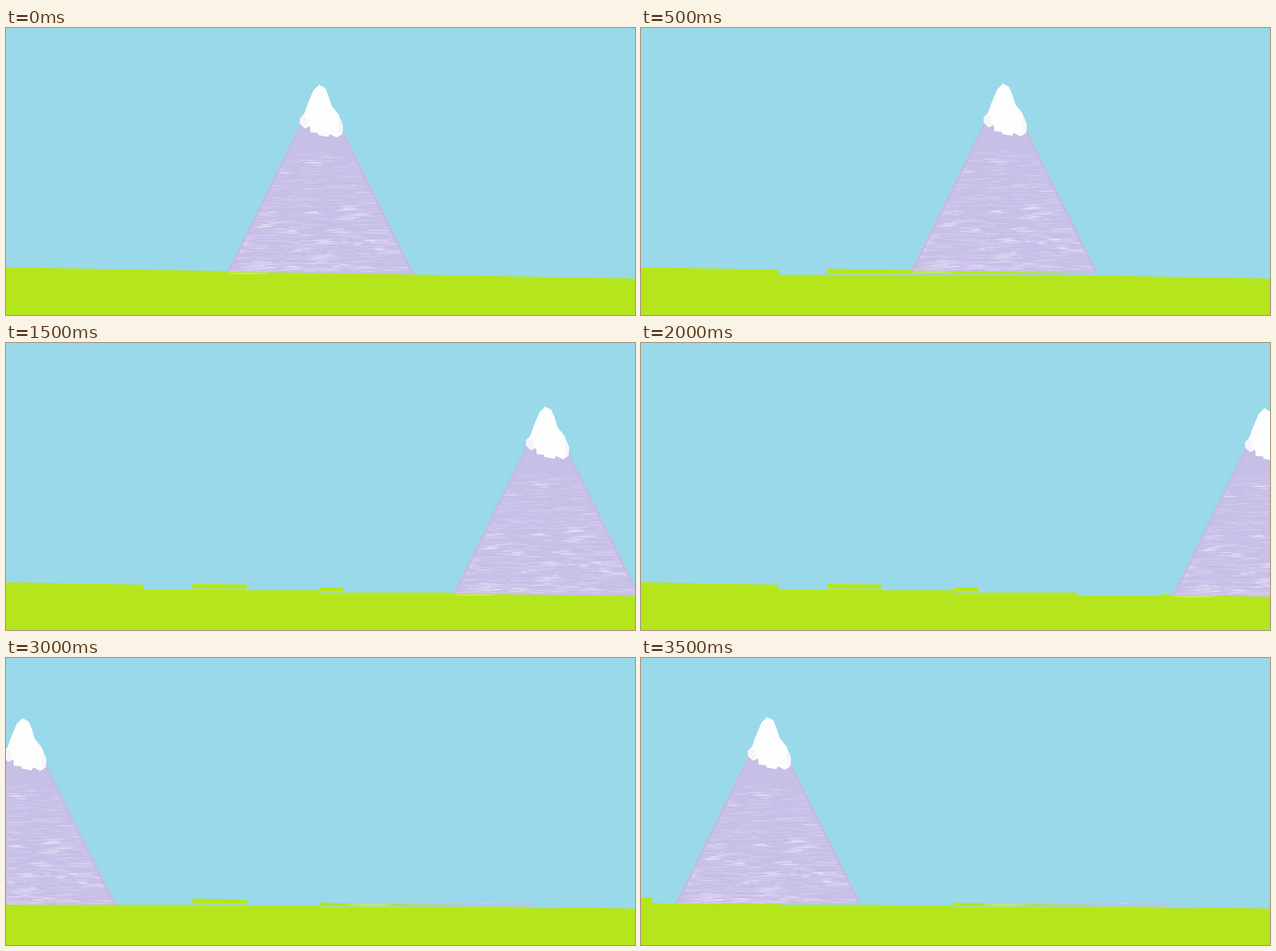
Animation, 1107 px wide and 506 px high, one loop 4000 ms. Source, as an HTML page with a canvas:

```html
<!DOCTYPE html>
<html lang="en">
<head>
<meta charset="utf-8">
<title>Mountain</title>
<style>
html, body { margin: 0; width: 100%; height: 100%; overflow: hidden; background: #99d9ea; }
canvas { display: block; }
</style>
</head>
<body>
<canvas id="stage" width="1107" height="506"></canvas>
<script>
const W = 1107, H = 506, STEP = 500;
const SKY = '#99d9ea', GRASS = '#b5e61d', LAVENDER = '#c8bfe7';
const PEAK = { x: 552, y: 100 }, SLOPE = 0.495;

let seed = 4242;
const rnd = () => (seed = (seed * 16807) % 2147483647) / 2147483647;
const spread = size => (rnd() - 0.5) * size;

function trace(g, pts) {
  g.beginPath();
  for (const [x, y] of pts) g.lineTo(x, y);
  g.closePath();
}

function poly(g, color, pts) {
  g.fillStyle = color;
  trace(g, pts);
  g.fill();
}

function blob(g, x, y, rx, ry) {
  g.beginPath();
  g.ellipse(x, y, rx, ry, 0, 0, Math.PI * 2);
  g.fill();
}

function newCanvas() {
  const c = document.createElement('canvas');
  c.width = W;
  c.height = H;
  return c.getContext('2d');
}

// One dry brush stroke, thin at both ends
function streak(g, x, y, len, thick, alpha) {
  g.fillStyle = `rgba(244,241,252,${alpha})`;
  blob(g, x, y, len / 2, thick / 2);
}

// A random place on the slope, denser towards the wide base
function onSlope() {
  const y = PEAK.y + 95 + Math.sqrt(rnd()) * 235;
  return [PEAK.x + spread(2 * SLOPE * (y - PEAK.y)), y];
}

function paintMountain(g) {
  const body = [[PEAK.x, PEAK.y], [718, 434], [389, 430]];
  poly(g, LAVENDER, body);
  g.save();
  trace(g, body);
  g.clip();
  for (let i = 0; i < 600; i++) streak(g, ...onSlope(), 10 + rnd() * 35, 0.6 + rnd() * 1.2, 0.08 + rnd() * 0.25);
  for (let i = 0; i < 26; i++) {
    const [x, y] = onSlope();
    for (let k = 0; k < 8; k++) streak(g, x + spread(26), y + spread(7), 10 + rnd() * 22, 0.7 + rnd(), 0.2 + rnd() * 0.35);
  }
  g.strokeStyle = '#c5bbe2';
  g.lineWidth = 8;
  trace(g, [body[2], body[0], body[1], body[0]]);
  g.stroke();
  g.restore();
  streak(g, 427, 432.5, 76, 1.6, 0.6);
}

function paintSnow(g) {
  const cap = [[551, 100], [562, 106], [567, 118], [573, 137], [585, 152], [593, 172], [592, 187], [582, 193],
    [570, 187], [567, 192], [550, 189], [549, 185], [536, 184], [535, 173], [526, 177], [517, 169],
    [517, 160], [525, 151], [529, 139], [535, 124], [541, 110]];
  g.save();
  poly(g, '#fdfdfe', cap);
  g.clip();
  g.fillStyle = '#f6f5fb';
  blob(g, 522, 168, 9, 14);
  blob(g, 590, 172, 5, 20);
  g.restore();
}

function opening() {
  const g = newCanvas();
  g.fillStyle = SKY;
  g.fillRect(0, 0, W, H);
  poly(g, GRASS, [[0, 421.8], [W, 441.8], [W, H], [0, H]]);
  paintMountain(g);
  paintSnow(g);
  return g.canvas;
}

// Cut a block out of the picture, leaving sky, and paste it elsewhere
function shift(picture, { left, right, bottom, dx, dy }) {
  const g = newCanvas(), top = 96, w = right - left, h = bottom - top;
  g.drawImage(picture, 0, 0);
  g.fillStyle = SKY;
  g.fillRect(left, top, w, h);
  g.drawImage(picture, left, top, w, h, left + dx, top + dy, w, h);
  return g.canvas;
}

const scenes = [opening()];
const moves = [
  { from: 0, left: 242, right: 721, bottom: 435, dx: 86, dy: -2 },
  { from: 1, left: 424, right: 851, bottom: 436, dx: 127, dy: 5 },
  { from: 2, left: 594, right: 978, bottom: 438, dx: 185, dy: 9 },
  { from: 3, left: 767, right: W, bottom: 446, dx: 148, dy: 3 },
  { from: 4, left: 764, right: W, bottom: 446, dx: W, dy: 0 },
  { from: 2, left: 562, right: 978, bottom: 432, dx: -735, dy: 3 },
  { from: 2, left: 562, right: 978, bottom: 432, dx: -542, dy: 1 }
];
for (const move of moves) scenes.push(shift(scenes[move.from], move));

const stage = document.getElementById('stage').getContext('2d');
const start = performance.now();
function tick() {
  const i = Math.floor((performance.now() - start) / STEP) % scenes.length;
  stage.drawImage(scenes[i], 0, 0);
  requestAnimationFrame(tick);
}
tick();
</script>
</body>
</html>
```
